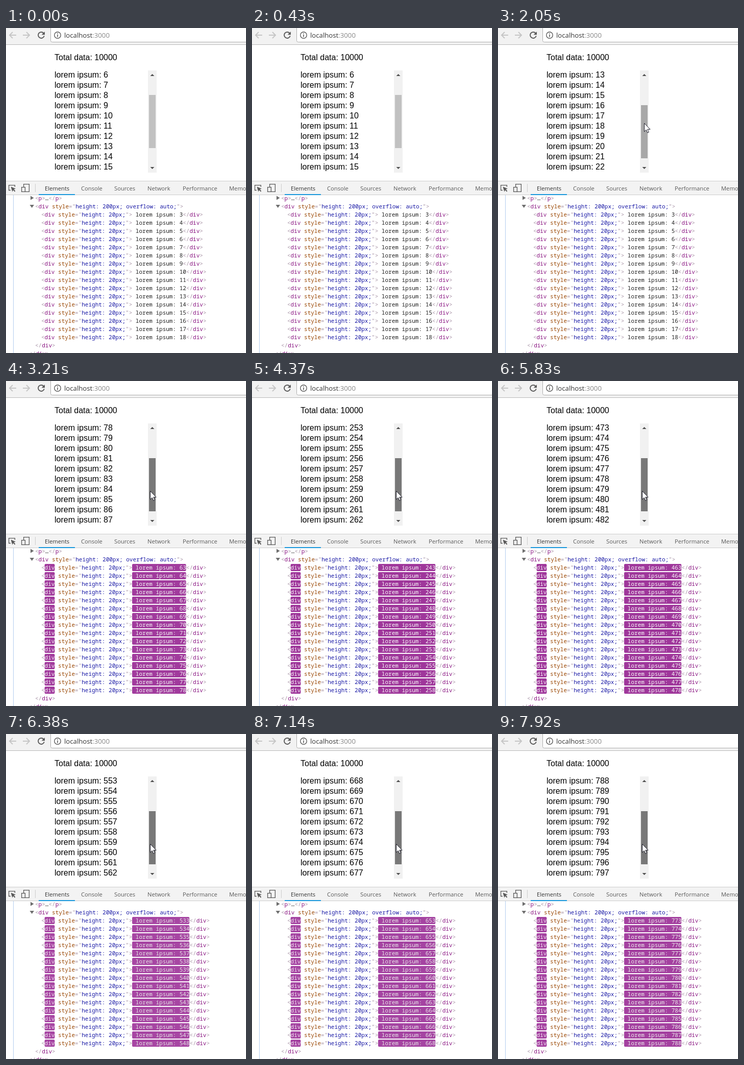
These frames come from a looping animation (470x636 px, 7.99 s). An HTML page:

```html
<!DOCTYPE html>
<html lang="en">
<head>
<meta charset="utf-8">
<title>Virtual list</title>
<style>
  html, body { margin: 0; width: 100%; height: 100%; overflow: hidden; background: #fff; }
  svg { display: block; width: 100%; height: 100%; }
  text { white-space: pre; }
  .ui { font: 13.2px "Open Sans", sans-serif; }
  .tab { font-size: 11.2px; fill: #5a5a5a; }
  .page { font: 16px "Liberation Sans", Arial, sans-serif; }
  .code { font: 11px "Noto Sans Mono", monospace; fill: #a894a6; }
  .tag { fill: #881280; }
  .attr { fill: #994500; }
  .val { fill: #1a1aa6; }
  .txt { fill: #222; }
</style>
</head>
<body>
<svg id="stage" viewBox="0 0 470 636" xmlns="http://www.w3.org/2000/svg"></svg>
<script>
const LOOP = 7990;
const ROWS = 16;
const CHAR = 6.6;
const stage = document.getElementById('stage');

const span = (cls, s) => `<tspan class="${cls}">${s}</tspan>`;
const open = (name, style) =>
  `&lt;${span('tag', name)} ${span('attr', 'style')}="${span('val', style)}"&gt;`;
const close = name => `&lt;/${span('tag', name)}&gt;`;
const code = (x, y, s) => `<text class="code" x="${x}" y="${y}">${s}</text>`;
const times = (n, fn) => Array.from({ length: n }, (_, i) => fn(i)).join('');

const tabs = [['Elements', 76], ['Console', 147], ['Sources', 212],
  ['Network', 277], ['Performance', 346], ['Memory', 437]];

const browserBar = `
  <rect width="470" height="33" fill="#f2f2f2"/>
  <rect y="32" width="470" height="1" fill="#b8b8b8"/>
  <rect x="87.5" y="-5" width="400" height="32.5" rx="3" fill="#fff" stroke="#adadad"/>
  <g fill="none" stroke="#c6c6c6" stroke-width="2">
    <path d="M20 14H7M13 8L7 14L13 20"/>
    <path d="M33 14H46M40 8L46 14L40 20"/>
  </g>
  <path d="M73.6 10A6 6 0 1 0 74.8 15.5" fill="none" stroke="#5a5a5a" stroke-width="2"/>
  <path d="M76 7V13.3H69.7Z" fill="#5a5a5a"/>
  <circle cx="101" cy="14" r="6.2" fill="none" stroke="#5a5a5a" stroke-width="1.4"/>
  <path d="M101 13V17.5M101 10.2V11.8" stroke="#5a5a5a" stroke-width="1.6"/>
  <text class="ui" x="114" y="19" fill="#333">localhost<tspan fill="#888">:3000</tspan></text>`;

const page = `
  <clipPath id="view"><rect x="95" y="83" width="183" height="200"/></clipPath>
  <text class="page" x="95" y="63">Total data: 10000</text>
  <g clip-path="url(#view)"><g id="list" class="page">
    ${times(11, i => `<text x="95" y="${97 + 20 * i}"></text>`)}
  </g></g>
  <rect x="278" y="83" width="17" height="200" fill="#f1f1f1"/>
  <path d="M282.5 94L286.5 90L290.5 94ZM282.5 272L286.5 276L290.5 272Z" fill="#505050"/>
  <rect id="thumb" x="280" width="13" height="104"/>`;

const elements = `
  <rect x="14" y="327" width="1" height="309" fill="#b4cdf0"/>
  <path d="M48 328.5L54.5 332.5L48 336.5ZM46.5 346H55L50.75 352Z" fill="#6e6e6e"/>
  ${code(57, 337, `&lt;${span('tag', 'p')}&gt;${span('txt', '…')}${close('p')}`)}
  ${code(57, 353, open('div', 'height: 200px; overflow: auto;'))}
  <g id="marks">${times(ROWS, i => `
    <rect x="75.6" y="${358 + 16 * i}" width="19.8" height="14" rx="2"/>
    <rect class="wide" x="247" y="${358 + 16 * i}" height="14" rx="2"/>`)}</g>
  <g id="dom">${times(ROWS, i =>
    code(69, 369 + 16 * i, open('div', 'height: 20px;') + span('txt', '') + close('div')))}</g>
  ${code(57, 625, close('div'))}
  ${code(45, 641, close('div'))}`;

const toolBar = `
  <rect y="299" width="470" height="28" fill="#f3f3f3"/>
  <path d="M0 299.5H470M0 326.5H470M57.5 305V321" stroke="#ccc"/>
  <rect x="64" y="325" width="71" height="2" fill="#1a98dc"/>
  <g fill="none" stroke="#5a5a5a" stroke-width="1.3">
    <path d="M9 317.5H5.6V307.6H17.4V311"/>
    <path d="M34.6 311V305.6H45.4V320.4H38"/>
    <rect x="30.6" y="311.6" width="6.8" height="8.8"/>
  </g>
  <path d="M9.5 310.5L19 314.5L15.4 315.8L18.4 319L17 320.4L14 317.2L12.4 320.5Z" fill="#5a5a5a"/>
  ${tabs.map(([name, x], i) =>
    `<text class="ui tab" x="${x}" y="318"${i ? '' : ' style="fill:#333"'}>${name}</text>`).join('')}`;

stage.innerHTML = `<rect width="470" height="636" fill="#fff"/>
  ${browserBar}${page}${elements}${toolBar}
  <path id="cursor" d="M.5 .5V16.8L4.2 13.3L6.8 19L9.3 18L6.8 12.3H12Z"
    fill="#fff" stroke="#1c1c28" stroke-linejoin="round"/>`;

const $ = id => document.getElementById(id);
const all = sel => [...stage.querySelectorAll(sel)];
const listRows = all('#list text');
const domRows = all('#dom text').map(row => ({
  tag: row.querySelector('.tag'), txt: row.querySelector('.txt')
}));
const wideMarks = all('#marks .wide');

const clamp = (v, lo = 0, hi = 1) => Math.min(hi, Math.max(lo, v));
const mix = (a, b, k) => `rgb(${a.map((v, i) => Math.round(v + (b[i] - v) * k))})`;

const clocks = [[2669, 77.06], [1358, 75], [210, 73.3]];
function hold(t) {
  const clock = clocks.find(c => t >= c[0]);
  if (!clock) return 0;
  const [start, period] = clock;
  return start + period * Math.floor((t - start) / period);
}

// Pointer paths as [time, x, y]
const crossing = [[210, 1, 609], [283, 220, 330], [357, 445, 50]];
const visit = [[1358, 451, 240], [1733, 286, 186], [2108, 286, 186], [2333, 282, 215]];
function along(path, t) {
  const i = path.findIndex(p => p[0] > t);
  if (i < 0) return path[path.length - 1].slice(1);
  const a = path[Math.max(0, i - 1)], b = path[i];
  const k = clamp((t - a[0]) / (b[0] - a[0] || 1));
  return [a[1] + (b[1] - a[1]) * k, a[2] + (b[2] - a[2]) * k];
}

const FLASH = 2108, PRESS = 2669, TICK = 97.55, TICK0 = 4347.5;
const drag = t => 253.5 + 0.1507 * (t - 4358);
const byFive = n => 5 * Math.floor((n - 3) / 5) + 3;

// First visible row, as a fraction while the wheel glides
function scrollAt(t) {
  if (t >= 2030) return Math.max(13, byFive(drag(t)));
  const k = clamp((t - 1820) / 210);
  return 6 + 2 * k * (2 - k);
}

// The element tree follows the list at its own slower rate.
function domAt(t) {
  if (t < FLASH) return { first: 3, age: Infinity };
  const tick = TICK0 + TICK * Math.floor((t - TICK0) / TICK);
  const first = byFive(drag(tick) - 8);
  return first > 8 ? { first, age: t - tick } : { first: 8, age: t - FLASH };
}

function render(time) {
  const t = hold(time);

  const pos = scrollAt(t), top = Math.floor(pos);
  $('list').setAttribute('transform', `translate(0 ${-20 * (pos - top)})`);
  listRows.forEach((row, i) => row.textContent = `lorem ipsum: ${top + i}`);
  $('thumb').setAttribute('y', 131 + 10 * Math.min(2, pos - 6));
  $('thumb').setAttribute('fill', t >= PRESS ? '#787878' : t >= 1700 ? '#a8a8a8' : '#c1c1c1');

  const { first, age } = domAt(t);
  const lit = age < 1400;
  const fade = 1 - (1 - clamp(age / 1120)) ** 2;
  $('marks').style.display = lit ? '' : 'none';
  $('marks').setAttribute('fill', mix([156, 50, 152], [245, 219, 244], fade));
  domRows.forEach(({ tag, txt }, i) => {
    const s = ` lorem ipsum: ${first + i}`;
    txt.textContent = s;
    txt.style.fill = lit ? mix([255, 255, 255], [34, 34, 34], fade) : '';
    tag.style.fill = lit ? mix([255, 255, 255], [136, 18, 128], fade) : '';
    wideMarks[i].setAttribute('width', s.length * CHAR);
  });

  const path = t >= 1358 ? visit : crossing;
  const shown = t >= 1358 || (t >= 210 && t < 429);
  const [x, y] = along(path, t);
  $('cursor').style.display = shown ? '' : 'none';
  $('cursor').setAttribute('transform', `translate(${Math.round(x)} ${Math.round(y)})`);
}

const start = performance.now();
function loop() {
  render((performance.now() - start) % LOOP);
  requestAnimationFrame(loop);
}
loop();
</script>
</body>
</html>
```
